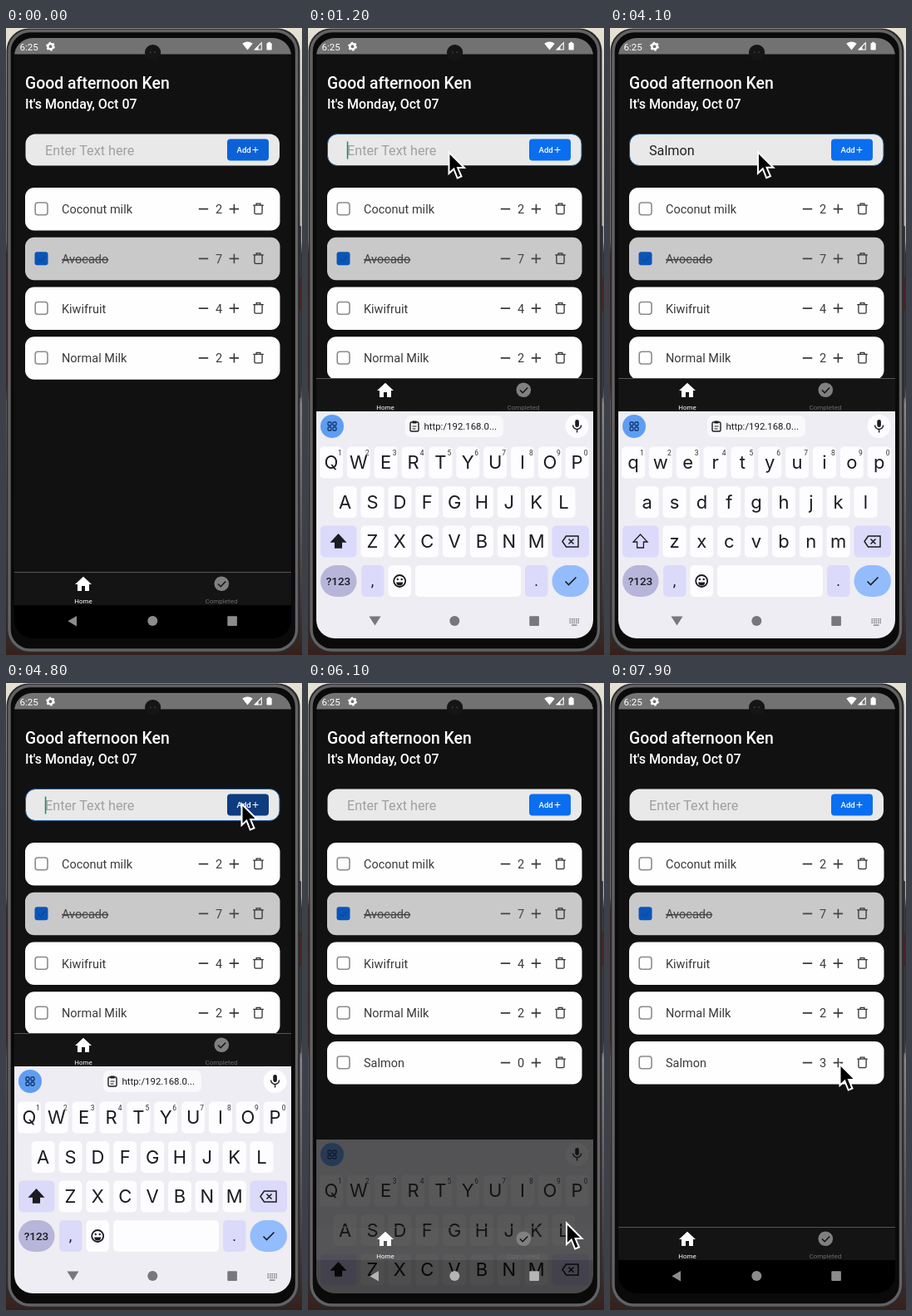
An HTML page for the animation above (8000 ms loop, 356 by 754 pixels).

```html
<!DOCTYPE html>
<html lang="en">
<head>
<meta charset="utf-8">
<title>Shopping list</title>
<style>
  html, body { margin: 0; width: 100%; height: 100%; overflow: hidden; background: #222; }
  svg { display: block; width: 356px; height: 754px; font-family: Roboto, sans-serif; }
  .key { font-family: Inter, sans-serif; }
</style>
</head>
<body>
<svg id="stage" viewBox="0 0 356 754"></svg>
<script>
const LOOP = 8000, STEP = 100;
const stage = document.getElementById('stage');

const rect = (x, y, w, h, fill, r = 0, extra = '') =>
  `<rect x="${x}" y="${y}" width="${w}" height="${h}" rx="${r}" fill="${fill}" ${extra}/>`;
const circle = (x, y, r, fill, extra = '') =>
  `<circle cx="${x}" cy="${y}" r="${r}" fill="${fill}" ${extra}/>`;
const shape = (d, fill, extra = '') => `<path d="${d}" fill="${fill}" ${extra}/>`;
const line = (d, stroke, w = 1.5, extra = '') =>
  `<path d="${d}" fill="none" stroke="${stroke}" stroke-width="${w}" ${extra}/>`;
const text = (s, x, y, size, fill, extra = '') =>
  `<text x="${x}" y="${y}" font-size="${size}" fill="${fill}" ${extra}>${s}</text>`;
const mid = 'text-anchor="middle"';
const at = (x, y, s, extra = '') => `<g transform="translate(${x} ${y})" ${extra}>${s}</g>`;

// Pointer stops: time, x, y
const stops = [
  [400, 352, 262], [700, 216, 213], [900, 168.5, 148], [1100, 168.5, 148], [1200, 169.5, 149.5],
  [4000, 169.5, 149.5], [4600, 283.5, 145.5], [5100, 283.5, 145.5], [5800, 311, 649.5],
  [6100, 311, 649.5], [6500, 340, 515], [6800, 340, 515], [7500, 276.5, 458.5], [8000, 276.5, 458.5]
];
// Typed letters: time, text
const typing = [[0, ''], [2000, 'S'], [2200, 'Sa'], [2400, 'Sal'], [2600, 'Salm'],
  [3000, 'Salmo'], [3400, 'Salmon'], [4800, '']];
const typedAt = t => typing.filter(k => k[0] <= t).pop()[1];

function pointer(t) {
  const i = stops.findIndex(s => s[0] > t);
  if (i < 1) return '';
  const [t0, x0, y0] = stops[i - 1], [t1, x1, y1] = stops[i];
  const u = (t - t0) / (t1 - t0), e = u * u * (3 - 2 * u);
  return at(x0 + (x1 - x0) * e, y0 + (y1 - y0) * e,
    shape('M0 0V25.5L5.8 20 10.2 31 15 29 10.6 18.6H18.5Z', '#000', 'stroke="#fff" stroke-width="2"'));
}

const trash = at(303.5, 25.5,
  line('M-6.3-4.3H6.3M-4.6-4.3V4.8Q-4.6 6.2-3.2 6.2H3.2Q4.6 6.2 4.6 4.8V-4.3M-2.4-4.5V-6.3H2.4V-4.5', '#333', 1.3));

function card(name, count, i) {
  const done = name === 'Avocado', ink = done ? '#444' : '#3a3a3a';
  return at(0, 192 + i * 59.75,
    rect(23, 0, 306.5, 51.5, done ? '#c9c9c9' : '#fefefe', 11) +
    (done
      ? rect(34.5, 17.5, 16, 16, '#0a55b6', 3) + line('M38.5 26l3 3 6-6.5', '#0a4b9f', 1.5)
      : rect(35.2, 18, 14.8, 14.8, 'none', 3, 'stroke="#8b8b8b" stroke-width="1.6"')) +
    text(name, 67, 31.2, 14.5, ink, done ? 'text-decoration="line-through"' : '') +
    line('M231.8 25.6h11.4M268.7 25.6h11.4M274.4 19.9v11.4', ink, 1.6) +
    text(count, 256, 31.2, 14.5, ink, mid) + trash);
}

function field(t, typed, focused) {
  const born = Math.max(1000, ...typing.map(k => k[0]).filter(k => k <= t));
  const caretOn = focused && (t < 1000 || (t - born) % 1000 < 500);
  const pressed = t >= 4700 && t < 5000;
  const blue = pressed ? '#0d3c80' : t < 400 ? '#0b62d8' : '#0a6ef0';
  return rect(23.5, 127.5, 305.5, 38, '#e9e9e9', 12, focused ? 'stroke="#1b5a9c"' : '') +
    text(typed || 'Enter Text here', 47, 152.6, 16.2, typed ? '#222' : '#a0a0a0', 'id="entry"') +
    (caretOn ? rect(0, 136.5, 1.5, 21, '#168a74', 0, 'id="caret"') : '') +
    rect(266, 133.5, 50, 26, blue, 4) +
    text('Add', 277.5, 150.2, 9.6, '#fff', 'font-weight="500"') +
    line('M296.5 146.5h7M300 143v7', '#fff', 1);
}

function keyRow(keys, x, y, upper, hints) {
  return [...keys].map((k, i) => {
    const cx = x + i * 32.85;
    return rect(cx - 14, y, 28, 38, '#fdfdff', 5) +
      text(upper ? k.toUpperCase() : k, cx, y + 26.7, 22, '#1b1b20', mid + ' class="key"') +
      (hints ? text((i + 1) % 10, cx + 10.5, y + 10, 8.5, '#333', mid) : '');
  }).join('');
}

function keyboard(upper, chip) {
  const lilac = '#dcdafb', ink = '#1b1b20';
  const grid = [[-5, -5], [1, -5], [-5, 1], [1, 1]]
    .map(([x, y]) => rect(29 + x, 479 + y, 4, 4, 'none', 1, 'stroke="#12356b" stroke-width="1.3"')).join('');
  const clipboard = rect(117, 466, 118, 26, '#f9f9fc', 7) +
    rect(123, 474, 10, 11, 'none', 1.5, `stroke="${ink}" stroke-width="1.4"`) +
    rect(125.5, 472.5, 5, 3, ink) + line('M125.5 479h5M125.5 482h4', ink, 1) +
    text('http:/192.168.0...', 139.5, 482.7, 11.4, ink);
  return rect(10, 461, 333, 300, '#eeedf3') +
    circle(29, 479, 14, '#5f9df2') + grid + (chip ? clipboard : '') +
    circle(323.5, 479, 14, '#fdfdff') + rect(321.3, 471, 4.6, 9, ink, 2.3) +
    line('M318.6 477.5a5 5 0 0 0 10 0M323.6 482.5v4', ink, 1.4) +
    keyRow('qwertyuiop', 28, 503.5, upper, true) +
    keyRow('asdfghjkl', 44.7, 551, upper) +
    keyRow('zxcvbnm', 77.5, 598.5, upper) +
    rect(15, 598.5, 43.5, 38, lilac, 5) + rect(293.5, 598.5, 44.5, 38, lilac, 5) +
    shape('M36.5 609l8.5 9h-4.6v7h-7.8v-7H28z', upper ? ink : 'none', `stroke="${ink}" stroke-width="1.3"`) +
    line('M306 617.5l4.5-6.5H325V624H310.5ZM313.5 614.5l6 6M319.5 614.5l-6 6', ink, 1.5) +
    rect(15, 646, 43.5, 38, '#b7b5da', 19) +
    text('?123', 36.5, 669.5, 13.5, ink, mid + ' font-weight="500"') +
    rect(64, 646, 27.5, 38, lilac, 5) + text(',', 77.5, 671, 18, ink, mid) +
    rect(96.5, 646, 27.5, 38, '#fdfdff', 5) +
    circle(110.2, 665, 7, 'none', `stroke="${ink}" stroke-width="1.8"`) +
    circle(107.8, 663, 1.2, ink) + circle(112.7, 663, 1.2, ink) +
    shape('M106.2 666.5h8a4 4 0 0 1-8 0', ink) +
    rect(129, 646, 127, 38, '#fdfdff', 5) +
    rect(261, 646, 27.5, 38, lilac, 5) + text('.', 274.7, 671, 18, ink, mid) +
    rect(293.5, 646, 44.5, 38, '#93bcfc', 19) + line('M309.5 665.5l4 4 9-9', ink, 1.6);
}

function tabs(dy, solid) {
  return at(0, dy,
    (solid ? rect(10, 654, 333, 40, '#141414') : '') +
    line('M10 654.5H343', '#555', 1) +
    shape('M91 677v-6h4v6h5v-8h3l-10-9.3-10 9.3h3v8z', '#fff') +
    text('Home', 93, 691.5, 8, '#fff', mid) +
    circle(259.3, 668.3, 8.8, '#808080') + line('M255 668.5l3.2 3.2 6-6.2', '#141414', 1.6) +
    text('Completed', 259, 691.5, 8, '#6c6c6c', mid));
}

function navIcons(fill, kbUp, down) {
  const dots = Array.from({ length: 15 }, (_, i) =>
    rect(314.5 + i % 5 * 2.5, 710 + (i / 5 | 0) * 2.3, 1.5, 1.4, fill)).join('');
  return shape(down ? 'M73.5 707.5h14L80.5 718.5z' : 'M85 707v12.5L74.3 713.2z', fill) +
    circle(176.3, 713, 6, fill) + rect(266.3, 707.3, 11.6, 11.6, fill, 1) +
    (kbUp ? dots + rect(317, 717.4, 6.5, 1.3, fill) : '');
}

const statusBar = rect(10, 10, 333, 21.5, '#727272') +
  text('6:25', 16.5, 26.5, 11.6, '#fff') +
  circle(53.5, 22.2, 3.2, 'none', 'stroke="#fff" stroke-width="2.4"') +
  circle(53.5, 22.2, 4.7, 'none', 'stroke="#fff" stroke-width="1.5" stroke-dasharray="2.4 2.52"') +
  shape('M284.3 18.8q6.2-4.6 12.4 0L290.5 26.5z', '#fff') +
  line('M307.3 17.8v8.2h-8.2z', '#fff', 1.1) + shape('M303.5 22v4.3h-4z', '#fff') +
  rect(313.5, 18, 6.2, 8.6, '#fff', 1) + rect(315.2, 16.8, 2.8, 2, '#fff') +
  circle(176.6, 29.5, 9.6, '#151515') + circle(173.8, 29.3, 1, '#3a3a3a') + circle(179, 29.3, 1, '#3a3a3a');

const greeting = text('Good afternoon Ken', 23, 73.2, 19.4, '#fff', 'font-weight="500"') +
  text("It's Monday, Oct 07", 23, 96.5, 16, '#fff', 'font-weight="500"');

const defs = `<defs>
  <linearGradient id="room" x2="0" y2="1">
    <stop offset="0" stop-color="#e6e1d2"/><stop offset=".34" stop-color="#b9b0a6"/>
    <stop offset=".36" stop-color="#4a2522"/><stop offset=".57" stop-color="#55201d"/>
    <stop offset=".6" stop-color="#8a8785"/><stop offset="1" stop-color="#35201c"/>
  </linearGradient>
  <clipPath id="screen">${rect(10, 12, 333, 722, '#000', 22)}</clipPath></defs>`;

const body = rect(0, 0, 356, 754, 'url(#room)') +
  rect(352, 238, 3, 62, '#3c3c3e', 1) + rect(352, 340, 3, 105, '#3c3c3e', 1) +
  rect(.5, .5, 353, 751, '#2a2a2c', 27) +
  rect(4, 3.5, 345.5, 744.5, '#0a0a0a', 25, 'stroke="#626264" stroke-width="3.4"');

function scene(t) {
  const focused = t >= 900 && t < 6000;
  const resized = t >= 1000 && t < 6000;
  const full = t >= 1200 && t < 6000;
  // Keyboard slide: [offset, opacity]
  const slide = full ? [0, 1] :
    { 1100: [60, .6], 6000: [32, .75], 6100: [88, .3], 6200: [150, .12] }[t];
  const typed = typedAt(t);
  const count = Math.max(0, Math.min(3, (t - 7600) / STEP));
  const items = [['Coconut milk', 2], ['Avocado', 7], ['Kiwifruit', 4], ['Normal Milk', 2]];
  if (t >= 4800) items.push(['Salmon', count]);

  const app = rect(10, 10, 333, 726, '#111') + greeting + field(t, typed, focused) +
    items.map(([name, n], i) => card(name, n, i)).join('');
  const base = resized ? rect(10, 461, 333, 233, '#fafafa') : rect(10, 654, 333, 40, '#141414');
  const tabBar = !resized ? tabs(0, false) : t >= 1100 ? tabs(-233, true) : '';
  const kb = slide ? at(0, slide[0], keyboard(!typed, focused), `opacity="${slide[1]}"`) : '';

  return defs + body + '<g clip-path="url(#screen)">' + app + base +
    rect(10, 694, 333, 42, '#000') + kb + tabBar +
    navIcons(full ? '#77777d' : slide && t > 6000 ? '#b5b5b5' : '#8c8c8c', resized, full) +
    statusBar + '</g>' + pointer(t);
}

function placeCaret(t) {
  const caret = document.getElementById('caret');
  if (!caret) return;
  const width = typedAt(t) ? document.getElementById('entry').getComputedTextLength() : 0;
  caret.setAttribute('x', 46.8 + width);
}

let shown = -1;
const start = performance.now();
function draw() {
  const t = Math.floor((performance.now() - start) % LOOP / STEP) * STEP;
  if (t !== shown) {
    shown = t;
    stage.innerHTML = scene(t);
    placeCaret(t);
  }
  requestAnimationFrame(draw);
}
draw();
</script>
</body>
</html>
```
